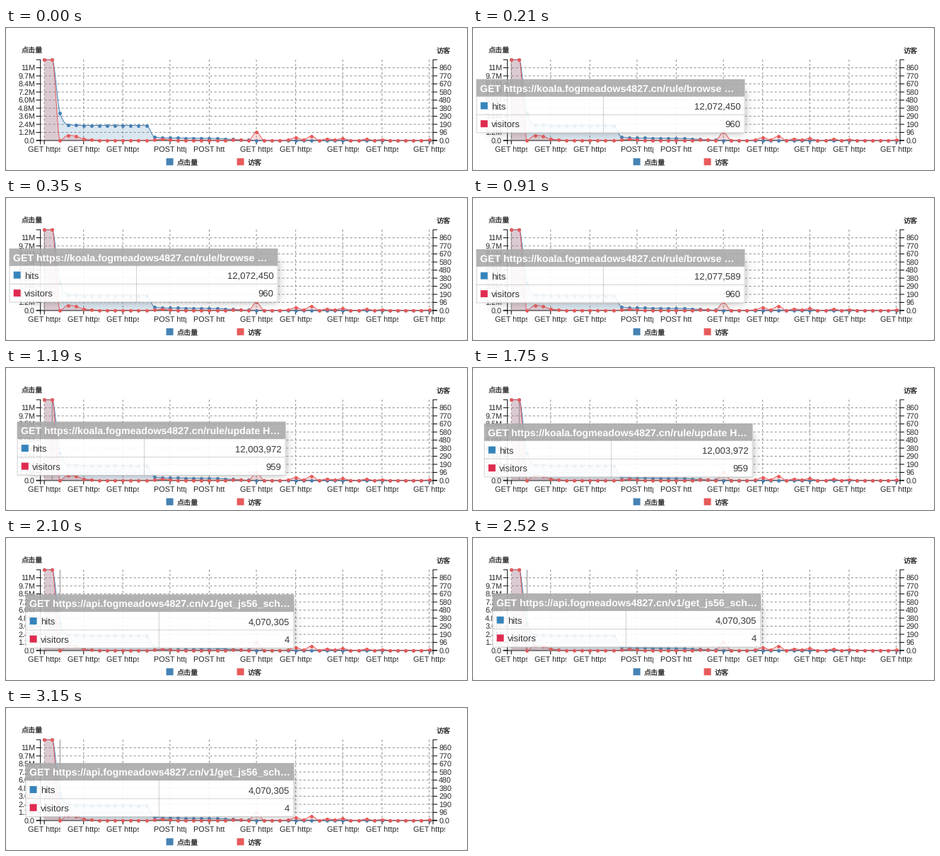
These frames come from a looping animation (652x202 px, 3.36 s). A matplotlib script:

```python
import matplotlib.pyplot as plt
import numpy as np
from matplotlib.animation import FuncAnimation
from matplotlib.patches import FancyBboxPatch, PathPatch, Rectangle
from matplotlib.path import Path

W, H, DPI = 652, 202, 100
PX = 72 / DPI  # points per pixel
STEP_MS, FRAMES = 70, 48

LEFT, RIGHT, TOP, BASE = 48.7, 604, 45.1, 160
X = np.linspace(54.2, 598.5, 50)
TICKS = [0, 5, 10, 16, 21, 27, 32, 38, 43, 49]
POST_TICKS = (16, 21)
BLUE, RED = "#4682b4", "#e85a5a"
TIP_BLUE, TIP_RED = "#1f77b4", "#dc143c"
GRID, INK = "#8c8c8c", "#262626"
SANS, CJK = "Liberation Sans", "Noto Sans CJK JP"

HITS = np.concatenate([
    [12.07, 12.07, 4.07, 2.34, 2.29],
    np.full(9, 2.25),
    [0.56, 0.40, 0.37, 0.37, 0.36, 0.35, 0.33, 0.32, 0.30, 0.24, 0.16, 0.10, 0.06],
    np.full(23, 0.03),
]) / 12.07
VISITORS = np.full(50, 3.0)
for i, v in {0: 960, 1: 960, 3: 62, 4: 51, 5: 18, 6: 9, 14: 6, 15: 15, 16: 7,
             24: 10, 25: 7, 27: 97, 31: 8, 32: 35, 33: 9, 34: 53, 36: 20,
             37: 9, 38: 24, 41: 17, 43: 12, 49: 9}.items():
    VISITORS[i] = v
VISITORS /= 960

plt.rcParams["text.hinting"] = "none"
fig = plt.figure(figsize=(W / DPI, H / DPI), dpi=DPI, facecolor="#e6e6e6")
ax = fig.add_axes([0, 0, 1, 1])
ax.set(xlim=(0, W), ylim=(H, 0))
ax.axis("off")


def text(x, y, s, size, ha="left", color=INK, font=SANS, **kw):
    """Text whose capitals are centred on y; size in pixels."""
    return ax.text(x, y + 0.36 * size, s, fontsize=size * PX, ha=ha, va="baseline",
                   color=color, family=font, **kw)


def line(xs, ys, color="black", width=1, **kw):
    return ax.plot(xs, ys, color=color, lw=width * PX, solid_capstyle="butt",
                   dash_capstyle="butt", snap=False, **kw)[0]


def rect(x, y, w, h, color, **kw):
    return ax.add_patch(Rectangle((x, y), w, h, fc=color, lw=0, snap=False, **kw))


def monotone(xs, ys):
    """Vertices and codes of a curve that never overshoots its points."""
    s = np.diff(ys) / np.diff(xs)
    mean = np.abs(s[:-1] + s[1:]) / 4
    inner = (np.sign(s[:-1]) + np.sign(s[1:])) * np.minimum(
        np.minimum(np.abs(s[:-1]), np.abs(s[1:])), mean)
    slope = np.concatenate([[(3 * s[0] - inner[0]) / 2], inner,
                            [(3 * s[-1] - inner[-1]) / 2]])
    p = np.column_stack([xs, ys])
    t = np.column_stack([np.ones_like(slope), slope]) * (xs[1] - xs[0]) / 3
    verts = [p[0]]
    for i in range(len(p) - 1):
        verts += [p[i] + t[i], p[i + 1] - t[i + 1], p[i + 1]]
    return verts, [Path.MOVETO] + [Path.CURVE4] * (len(verts) - 1)


def series(share, color, z):
    ys = BASE - share * (BASE - TOP)
    verts, codes = monotone(X, ys)
    area = verts + [(X[-1], BASE), (X[0], BASE)]
    ax.add_patch(PathPatch(Path(area, codes + [Path.LINETO] * 2),
                           fc=color, alpha=0.2, lw=0, zorder=z))
    ax.add_patch(PathPatch(Path(verts, codes), fc="none", ec=color,
                           lw=PX, zorder=z + 0.1))
    ax.plot(X, ys, "o", ms=5 * PX, mew=0, color=color, snap=False, zorder=z + 0.2)


def two_digits(v):
    return f"{float(f'{v:.1e}'):.0f}" if v else "0.0"


def millions(v):
    return f"{v:.0f}M" if v >= 10 else f"{v:.1f}M" if v else "0.0"


def draw_axes():
    labels = []
    for i in range(10):
        y = BASE - i * (BASE - TOP) / 10
        if i:
            line([LEFT, RIGHT], [y, y], GRID, dashes=(3, 3), zorder=1)
        line([LEFT - 6, LEFT], [y, y], zorder=2)
        line([RIGHT, RIGHT + 6], [y, y], zorder=2)
        labels.append(text(41, y - 0.1, "", 10.8, "right"))
        text(612.2, y - 0.1, two_digits(96 * i), 10.8)
    for i in TICKS:
        x = X[i]
        line([x, x], [TOP, BASE], GRID, dashes=(3, 3), zorder=1)
        line([x, x], [BASE, BASE + 5.5], zorder=2)
        word = "POST" if i in POST_TICKS else "GET"
        label = text(x - 22.8, 173.1, word + " https", 10.9, clip_on=True)
        label.set_clip_path(Rectangle((x - 24, 165), 46.7, 16,
                                      transform=ax.transData))
    line([LEFT - 6, LEFT, LEFT, LEFT - 6], [TOP, TOP, BASE, BASE], zorder=2)
    line([RIGHT + 6, RIGHT, RIGHT, RIGHT + 6], [TOP, TOP, BASE, BASE], zorder=2)
    line([LEFT, LEFT, RIGHT, RIGHT], [BASE + 5.5, BASE, BASE, BASE + 5.5], zorder=2)
    text(37.2, 32, "点击量", 10.1, "center", font=CJK)
    text(619, 32, "访客", 10.1, "center", font=CJK)
    for x, name, color in [(226.6, "点击量", BLUE), (326.6, "访客", RED)]:
        rect(x, 185.3, 10, 10, color)
        text(x + 15.2, 191.2, name, 10.1, font=CJK)
    return labels


HOST = "fogmeadows4827.cn"
TIPS = {  # title, hits, visitors, left edge, divider offset, hovered point
    "browse": (f"GET https://koala.{HOST}/rule/browse …", "12,072,450", "960", 4.5, 180, 0),
    "reload": (f"GET https://koala.{HOST}/rule/browse …", "12,077,589", "960", 4.5, 180, 0),
    "update": (f"GET https://koala.{HOST}/rule/update H…", "12,003,972", "959", 15.6, 180, 1),
    "schema": (f"GET https://api.{HOST}/v1/get_js56_sch…", "4,070,305", "4", 27.4, 189, 2),
}
# (start ms, tip, top edge)
STEPS = [
    (0, None, 0),
    (140, "browse", 73.8), (210, "browse", 72.8), (280, "browse", 71.8),
    (840, "reload", 72.3), (910, "reload", 72.8),
    (980, "update", 76.3), (1540, "update", 77.8), (1610, "update", 78.8),
    (1820, "schema", 79.3), (1960, "schema", 79.8), (2100, "schema", 80.3),
    (2450, "schema", 79.6), (2520, "schema", 78.9), (2590, "schema", 78.3),
]
TIP_W, HEAD_H, ROW_H = 380, 25, 25.6
TIP_H = HEAD_H + 2 * ROW_H


def shadow(left, top):
    """Soft shadow to the lower right, left out beneath the box."""
    pad = 16
    xs = np.arange(TIP_W + pad) + 0.5
    ys = np.arange(int(TIP_H) + pad) + 0.5

    def soft(v, lo, hi):
        return 1 / (1 + np.exp((lo - v) / 3.5)) / (1 + np.exp((v - hi) / 3.5))

    alpha = np.outer(soft(ys, 16, TIP_H - 2), soft(xs, 16, TIP_W - 2))
    alpha[:int(TIP_H), :TIP_W] = 0
    image = np.full(alpha.shape + (4,), 0.467)
    image[..., 3] = alpha * 0.9
    return ax.imshow(image, extent=(left, left + len(xs), top + len(ys), top),
                     aspect="auto", zorder=8)


def draw_tip(name, top):
    title, hits, visitors, left, divider, point = TIPS[name]
    body = top + HEAD_H
    style = dict(alpha=0.9, zorder=10)
    ink = dict(alpha=0.9, zorder=12)
    parts = [
        line([X[point]] * 2, [TOP, BASE], GRID, zorder=2.5),
        shadow(left, top),
        rect(left, top, TIP_W, HEAD_H, "#aaaaaa", **style),
        rect(left, body, TIP_W, 2 * ROW_H, "white", **style),
        line([left + 0.5, left + 0.5, left + TIP_W - 0.5, left + TIP_W - 0.5],
             [body, top + TIP_H, top + TIP_H, body], "#cccccc", **ink),
        line([left, left + TIP_W], [body + ROW_H] * 2, "#cccccc", **ink),
        line([left + divider] * 2, [body, top + TIP_H], "#999999",
             dashes=(1, 1), **ink),
        text(left + 5.3, top + 12.7, title, 14.12, color="white",
             weight="bold", zorder=12),
    ]
    rows = [("hits", hits, TIP_BLUE), ("visitors", visitors, TIP_RED)]
    for i, (label, value, color) in enumerate(rows):
        y = body + (i + 0.5) * ROW_H
        parts += [
            rect(left + 6.2, y - 5, 10, 10, color, **ink),
            text(left + 21.4, y + 0.3, label, 13.1, color="#222222", **ink),
            text(left + TIP_W - 6, y + 0.3, value, 13.1, "right",
                 color="#222222", **ink),
        ]
    return parts


ax.add_patch(FancyBboxPatch((3, 3), W - 6, H - 6, fc="white", lw=0, zorder=0,
                            boxstyle="round,pad=3,rounding_size=3"))
hit_labels = draw_axes()
series(HITS, BLUE, 3)
series(VISITORS, RED, 4)
tip_parts = []


def update(frame):
    now = frame * STEP_MS
    peak = 12.069 if now < 140 else 12.077
    for i, label in enumerate(hit_labels):
        label.set_text(millions(i * peak / 10))
    while tip_parts:
        tip_parts.pop().remove()
    _, name, top = [step for step in STEPS if step[0] <= now][-1]
    if name:
        tip_parts.extend(draw_tip(name, top))
    return []


anim = FuncAnimation(fig, update, frames=FRAMES, interval=STEP_MS,
                     init_func=lambda: [], repeat=True, blit=False)
plt.show()
```
